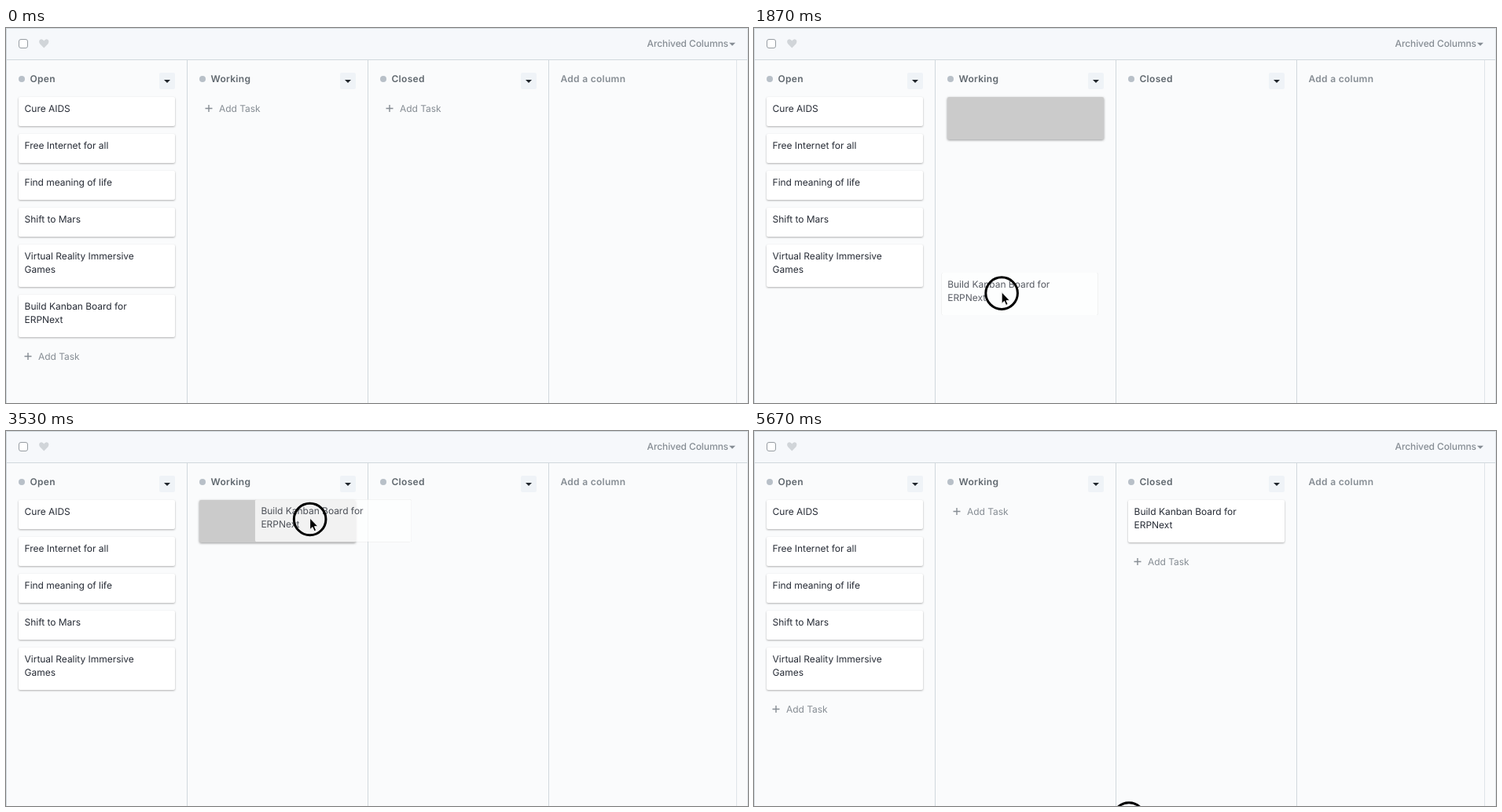
An HTML page for the animation above (5740 ms loop, 944 by 478 pixels).

```html
<!DOCTYPE html>
<html lang="en">
<head>
<meta charset="utf-8">
<title>Kanban board</title>
<style>
html, body { margin: 0; width: 100%; height: 100%; overflow: hidden; background: #fafbfc; }
svg { display: block; width: 944px; height: 478px; font: 12px Inter, "Open Sans", sans-serif;
  letter-spacing: -.03px; text-rendering: geometricPrecision; }
.title { font-weight: 600; fill: #60686f; letter-spacing: .28px; }
.muted { fill: #868d94; }
.title.muted { fill: #868d94; }
.menu { font-weight: 500; letter-spacing: -.1px; }
.card rect { fill: #fff; filter: drop-shadow(0 1px 1px rgba(0, 0, 0, .3)); }
.card text { fill: #272c36; }
.card.hover rect { filter: drop-shadow(0 1.5px 1.5px rgba(0, 0, 0, .4)); }
.ghost { opacity: .76; }
.ghost rect { filter: drop-shadow(0 0 .5px rgba(0, 0, 0, .25)); }
.slot { fill: #cbcbcb; filter: drop-shadow(0 1.5px 1.5px rgba(0, 0, 0, .4)); }
</style>
</head>
<body>
<svg id="stage" viewBox="0 0 944 478" xmlns="http://www.w3.org/2000/svg"></svg>
<script>
const FPS = 15, LOOP = 5740, LAST = 85;
const CARD_W = 199, PITCH = 230, TOP = 88, GAP = 10;
const stage = document.getElementById('stage');

const height = lines => lines.length > 1 ? 54 : 37;
const text = (x, y, s, cls = '') => `<text x="${x}" y="${y}" class="${cls}">${s}</text>`;
const line = (x1, y1, x2, y2, color = '#d1d8dd') =>
  `<path d="M${x1} ${y1}L${x2} ${y2}" stroke="${color}"/>`;
const caret = (x, y, w, fill) =>
  `<path d="M${x - w} ${y}h${2 * w}l${-w} ${w}z" fill="${fill}"/>`;

const card = (x, y, lines, id = '') =>
  `<g class="card" ${id && `id="${id}"`} transform="translate(${x} ${y})">
    <rect width="${CARD_W}" height="${height(lines)}" rx="2"/>
    ${lines.map((s, i) => text(7.6, 19 + 17 * i, s)).join('')}</g>`;

function column(name, i) {
  const x = i * PITCH;
  return `<circle cx="${x + 20}" cy="65" r="4" fill="#b8c0c8"/>
    ${text(x + 30.5, 69, name, 'title')}
    <rect x="${x + 195}" y="57" width="20" height="21" rx="2" fill="#eff3f7"/>
    ${caret(x + 205, 66, 4, '#20262c')}${line(x + 230.5, 41, x + 230.5, 478)}
    <g id="add${i}"><path d="M23.5 0h9M28 -4.5v9" stroke="#868d94" stroke-width="1.4"/>
    ${text(41, 4.3, 'Add Task', 'muted')}</g>`;
}

const build = ['Build Kanban Board for', 'ERPNext'];
const tasks = [['Cure AIDS'], ['Free Internet for all'], ['Find meaning of life'],
  ['Shift to Mars'], ['Virtual Reality Immersive', 'Games']];

let listEnd = TOP;
const taskCards = tasks.map(lines => {
  const y = listEnd;
  listEnd += height(lines) + GAP;
  return card(16, y, lines);
}).join('');

stage.innerHTML = `
  <rect width="944" height="478" fill="#fafbfc"/>
  <rect width="944" height="40" fill="#f6f8fb"/>
  ${line(0, .5, 944, .5)}${line(0, 40.5, 944, 40.5)}${line(.5, 0, .5, 478)}
  ${line(929.5, 41, 929.5, 478, '#dfe4e8')}${line(943.5, 0, 943.5, 478, '#dfe4e8')}
  <rect x="16.5" y="14.5" width="11" height="11" rx="2.5" fill="#fff" stroke="#969ca2"/>
  <path d="M48.3 25.5L43.2 20.3C40.8 17.2 43 14 45.7 14.4Q47.5 14.6 48.3 16.5
    Q49.1 14.6 50.9 14.4C53.6 14 55.8 17.2 53.4 20.3Z" fill="#d1d5d9"/>
  ${text(815.5, 24, 'Archived Columns', 'muted menu')}${caret(924, 18.7, 4, '#868d94')}
  ${['Open', 'Working', 'Closed'].map(column).join('')}
  ${text(705.5, 69, 'Add a column', 'title muted')}
  ${taskCards}
  <rect id="slot" class="slot" width="${CARD_W}" height="54" rx="2"/>
  ${card(0, 0, build, 'build')}
  <g class="ghost">${card(0, 0, build, 'ghost')}</g>
  <g id="cursor">
    <circle id="ring" r="20.3" fill="none" stroke="#000" stroke-width="3"/>
    <path id="arrow" d="M0 -1.5V13.3L3.3 10.2L5.5 15.3L8 14.2L5.9 9.3H10.4Z"
      fill="#000" stroke="#fff" stroke-linejoin="round"/>
    <path id="hand" d="M-1.4 8.3V.7C-1.4 -1.3 1.6 -1.3 1.7 .7V4.8C2.2 3.7 4.3 3.9 4.5 5.3
      C5.2 4.3 7 4.7 7.1 6C8 5.3 9.6 5.8 9.6 7.5V10.5C9.6 12.5 8.5 13.2 8.3 15.5H.6
      C.2 13.3 -2.8 11.1 -4.3 8.9C-5.2 7.3 -3.2 6.1 -1.4 8.3ZM2.2 9.5v3.4m2.3 0v-3.4m2.3 0v3.4"
      fill="#fff" stroke="#222" stroke-width="1.3" stroke-linejoin="round"/>
  </g>`;

const el = {};
for (const node of stage.querySelectorAll('[id]')) el[node.id] = node;

// Pointer stops: step, x, y
const stops = [
  [0, 477, 494], [6, 190, 415], [17, 92.5, 366], [20, 92.5, 366],
  [24, 277, 348], [27, 308, 345], [34, 344.5, 218], [45, 321, 116],
  [50, 315.5, 113], [58, 543.7, 112], [61, 546, 112], [75, 500, 444], [LAST, 477, 494]
];

// Each drag takes the card one column on: press, reach the next column, drop
const drags = [{ press: 20, reach: 25, drop: 36 }, { press: 49, reach: 58, drop: 61 }];

// Smooth monotone interpolation of coordinate k
function along(n, k) {
  let i = 0;
  while (i < stops.length - 2 && n >= stops[i + 1][0]) i++;
  const slope = j => j < 0 || j > stops.length - 2 ? 0
    : (stops[j + 1][k] - stops[j][k]) / (stops[j + 1][0] - stops[j][0]);
  const tangent = j => {
    const a = slope(j - 1), b = slope(j);
    return a * b > 0 ? 2 * a * b / (a + b) : 0;
  };
  const [p, q] = [stops[i], stops[i + 1]];
  const d = q[0] - p[0], u = (n - p[0]) / d, v = 1 - u;
  return p[k] * (1 + 2 * u) * v * v + q[k] * (3 - 2 * u) * u * u
    + d * u * v * (tangent(i) * v - tangent(i + 1) * u);
}

const home = col => ({ x: 16 + col * PITCH, y: col ? TOP : listEnd });
const show = (node, on) => { node.style.display = on ? '' : 'none'; };
const move = (node, x, y) => node.setAttribute('transform', `translate(${x} ${y})`);

function draw(ms) {
  const n = Math.min(LAST, Math.floor((ms + 4) * FPS / 1000));
  const x = along(n, 1), y = along(n, 2);
  const drag = drags.find(d => n >= d.press && n < d.drop);
  const dragging = !!drag && n > drag.press;
  const col = drags.filter(d => n >= d.reach).length;
  const at = home(col);
  const over = !dragging && x > at.x && x < at.x + CARD_W && y > at.y && y < at.y + 54;

  [listEnd - GAP, TOP - GAP, TOP - GAP].forEach((end, i) => {
    const add = el['add' + i];
    move(add, i * PITCH, (i === col ? at.y + 54 : end) + 24.5);
    show(add, !dragging);
  });

  if (drag) {
    const from = home(drags.indexOf(drag));
    move(el.ghost, from.x + x - along(drag.press, 1), from.y + y - along(drag.press, 2));
  }
  move(el.slot, at.x, at.y);
  move(el.build, at.x, at.y);
  show(el.slot, dragging);
  show(el.build, !dragging);
  show(el.ghost, dragging);
  el.build.classList.toggle('hover', over);

  move(el.cursor, x, y);
  show(el.ring, drag || n >= LAST - 1);
  show(el.hand, over);
  show(el.arrow, !over);
}

function tick() {
  draw(performance.now() % LOOP);
  requestAnimationFrame(tick);
}
tick();
</script>
</body>
</html>
```
